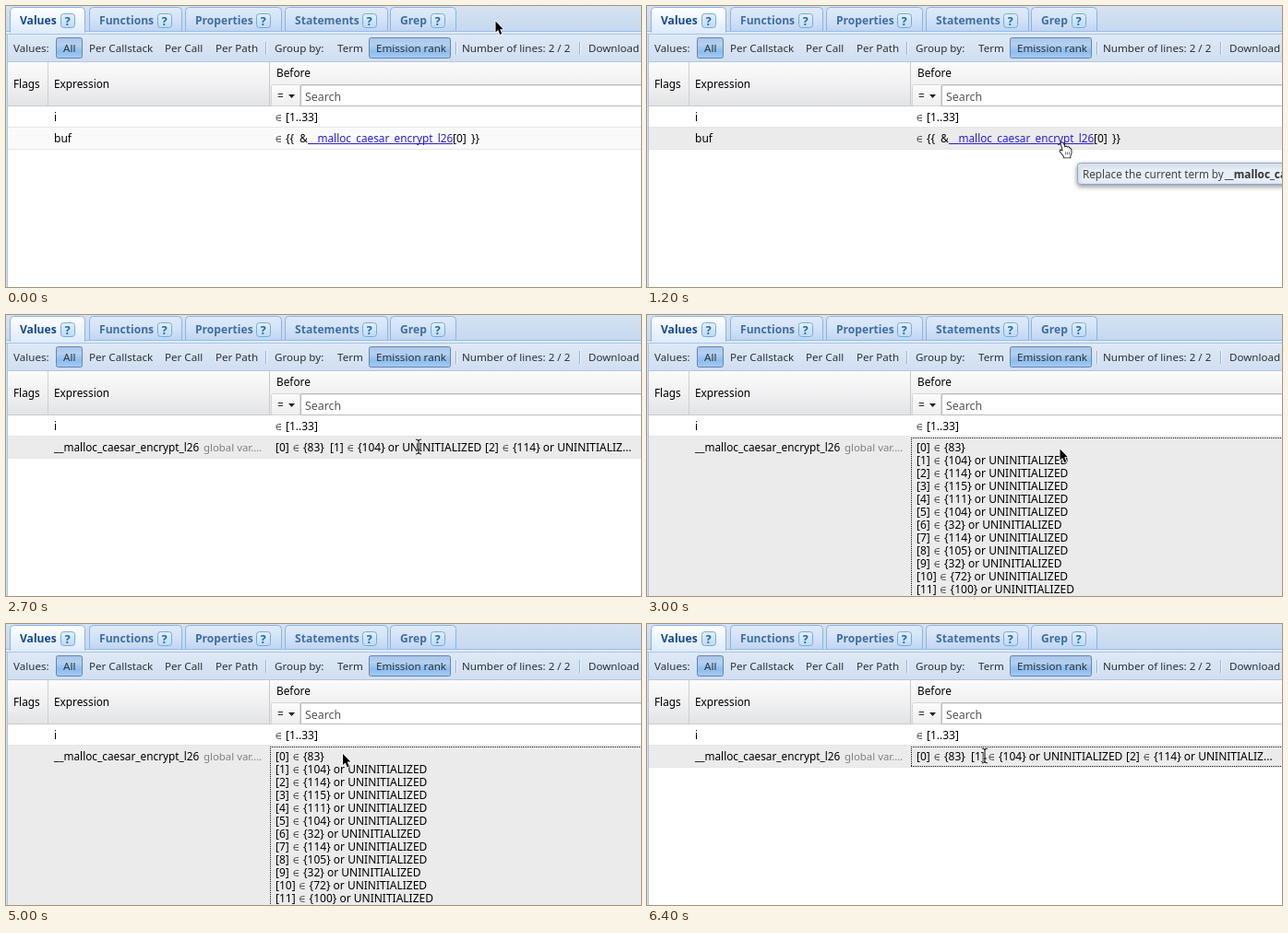
An HTML page with a canvas for the animation above (6.5 s loop, 688 px wide and 305 px high).

```html
<!DOCTYPE html>
<html lang="en">
<head>
<meta charset="utf-8">
<title>Values panel</title>
<style>
html, body { margin: 0; width: 100%; height: 100%; overflow: hidden; background: #fff; }
canvas { display: block; }
</style>
</head>
<body>
<canvas id="stage" width="688" height="305"></canvas>
<script>
const ctx = document.getElementById('stage').getContext('2d');
const W = 688, H = 305, LOOP = 6500;
const FAMILY = '"Noto Sans", "Open Sans", sans-serif';
const LOAD = 1520, READY = 2050, EXPAND = 3000, COLLAPSE = 5200;
const TIP_ON = 1050;
const NAME = '__malloc_caesar_encrypt_l26';

// time, x, y
const PATH = [
  [100, 530, 16], [850, 448, 146], [1500, 447, 145], [3150, 447, 145],
  [3900, 280, 253], [4010, 279, 270], [4150, 280, 266], [4850, 364, 139.5],
  [5300, 366, 143]
];
const VALUES = [83, 104, 114, 115, 111, 104, 32, 114, 105, 32, 72, 100];

function rect(x, y, w, h, fill) {
  ctx.fillStyle = fill;
  ctx.fillRect(x, y, w, h);
}

function shade(y0, y1, ...colors) {
  const g = ctx.createLinearGradient(0, y0, 0, y1);
  colors.forEach((c, i) => g.addColorStop(i / (colors.length - 1), c));
  return g;
}

function box(x, y, w, h, r, fill, stroke) {
  ctx.beginPath();
  ctx.roundRect(x + 0.5, y + 0.5, w - 1, h - 1, r);
  ctx.fillStyle = fill;
  ctx.fill();
  ctx.strokeStyle = stroke;
  ctx.lineWidth = 1;
  ctx.stroke();
}

function text(s, x, y, color = '#000', size = 11.8, weight = 400) {
  ctx.font = `${weight} ${size}px ${FAMILY}`;
  ctx.fillStyle = color;
  ctx.fillText(s, x, y);
}

function cell(s, x, y) {
  text(s, x, y, '#000', 12);
}

function line(points, color, width) {
  ctx.beginPath();
  points.forEach(([x, y], i) => i ? ctx.lineTo(x, y) : ctx.moveTo(x, y));
  ctx.strokeStyle = color;
  ctx.lineWidth = width;
  ctx.stroke();
}

// Small "element of" sign
function member(x, base) {
  ctx.beginPath();
  ctx.moveTo(x + 6, base - 6.5);
  ctx.lineTo(x + 3.8, base - 6.5);
  ctx.arc(x + 3.8, base - 3.5, 3, -Math.PI / 2, Math.PI / 2, true);
  ctx.lineTo(x + 6, base - 0.5);
  ctx.moveTo(x + 1, base - 3.5);
  ctx.lineTo(x + 6, base - 3.5);
  ctx.strokeStyle = '#333';
  ctx.lineWidth = 0.8;
  ctx.stroke();
}

function tab(label, x, w, textX, helpX, active) {
  const fill = active ? shade(2, 28, '#ffffff', '#eef5fe', '#deecfd')
                      : shade(2, 27, '#dfeaf8', '#d3e3f7', '#bfd6f2');
  ctx.beginPath();
  ctx.roundRect(x + 0.5, 1.5, w - 1, 27, [4, 4, 0, 0]);
  ctx.fillStyle = fill;
  ctx.fill();
  ctx.strokeStyle = '#8db2e3';
  ctx.lineWidth = 1;
  ctx.stroke();
  text(label, textX, 20, active ? '#15498b' : '#416da3', 12.1, 700);
  box(helpX, 8, 16, 16, 3, shade(8, 24, '#e6f1fc', '#bcd9f4'), '#76abdd');
  text('?', helpX + 4.7, 20.5, '#1f66b0', 12.5, 700);
}

function drawTabs() {
  rect(0, 0, W, 31, shade(0, 27, '#d5e2f2', '#c6d9ef'));
  tab('Functions', 90, 101, 101, 164);
  tab('Properties', 194, 105, 205, 271);
  tab('Statements', 302, 112, 313, 386);
  tab('Grep', 416, 72, 427, 460);
  rect(0, 27, W, 1, '#99bbe8');
  rect(0, 28, W, 3, '#deecfd');
  tab('Values', 4, 82, 15, 59, true);
  rect(5, 28, 80, 3, '#deecfd');
  rect(0, 30, W, 1, '#a9c5e8');
}

function pressed(x, w) {
  box(x, 34, w, 23, 2, shade(34, 57, '#a9c5e8', '#b4d0f0', '#8dbdec', '#a5cdf4'), '#6685b0');
}

function drawToolbar() {
  rect(0, 31, W, 30, shade(31, 61, '#dfe9f6', '#cfdef1'));
  pressed(54, 29);
  pressed(393, 89);
  [['Values:', 8], ['All', 62], ['Per Callstack', 90], ['Per Call', 172],
   ['Per Path', 227], ['Group by:', 291], ['Term', 359], ['Emission rank', 401],
   ['Number of lines: 2 / 2', 494], ['Download', 631]
  ].forEach(([s, x]) => text(s, x, 50, '#2c3138', 11.6));
  for (const x of [281, 487, 621]) {
    rect(x, 39, 1, 14, '#98b4d6');
    rect(x + 1, 39, 1, 14, '#f4f8fd');
  }
}

function drawHeader() {
  rect(0, 61, W, 48, shade(61, 109, '#fbfbfb', '#f1f1f2', '#e2e3e5'));
  rect(0, 60, W, 1, '#b4c8e0');
  rect(45, 61, 1, 47, '#cfcfcf');
  rect(285, 61, 1, 47, '#c9c9c9');
  rect(0, 108, W, 1, '#cbcbcb');
  text('Flags', 8, 89);
  text('Expression', 52, 89);
  text('Before', 293, 77);
  box(287, 85, 32, 24, 2, shade(85, 109, '#fcfcfc', '#eeeeef'), '#d6d6d6');
  text('=', 294, 102, '#222');
  ctx.beginPath();
  ctx.moveTo(306, 96);
  ctx.lineTo(313, 96);
  ctx.lineTo(309.5, 100);
  ctx.fillStyle = '#222';
  ctx.fill();
  box(319, 85, W, 24, 0, '#fff', '#b9bbbf');
  rect(320, 86, W, 1, '#e6e6e6');
  text('Search', 324, 102.5, '#555', 12.4);
}

function drawRow(y, h, fill) {
  rect(2, y, W, h, fill);
  rect(2, y + h - 1, W, 1, '#e6e6e6');
}

function drawFirstRow(hover) {
  drawRow(109, 23, hover ? '#ebebec' : '#ffffff');
  cell('i', 52, 125);
  member(292, 125);
  cell('[1..33]', 303, 125);
}

function drawLinkRow(hover) {
  drawRow(132, 24, hover ? '#ebebec' : '#fafafa');
  cell('buf', 52, 148);
  member(292, 148);
  cell('{{', 303, 148);
  cell('&', 318, 148);
  text(NAME, 327, 148, '#2a1fd6');
  rect(327, 149, 157, 1, '#2a1fd6');
  cell('[0]', 484, 148);
  cell('}}', 504, 148);
}

// One array entry, e.g. "[3] in {115} or UNINITIALIZED"
function entry(i, x, y, tail) {
  const shift = (String(i).length - 1) * 6.6;
  cell(`[${i}]`, x, y);
  member(x + shift + 19, y);
  cell(`{${VALUES[i]}}${tail}`, x + shift + 30, y);
}

function dotted(x, y, w, h) {
  ctx.setLineDash([1, 1]);
  line([[x, y + 0.5], [x + w, y + 0.5]], '#111', 1);
  line([[x, y + h + 0.5], [x + w, y + h + 0.5]], '#111', 1);
  line([[x + 0.5, y], [x + 0.5, y + h]], '#111', 1);
  ctx.setLineDash([]);
}

function drawArrayRow(expanded, focus) {
  drawRow(132, expanded ? 190 : 24, '#ebebec');
  text(NAME, 52, 148);
  text('global var....', 214, 148, '#808080', 11.4);
  if (expanded) {
    VALUES.forEach((v, i) => entry(i, 292, 148 + i * 14, i ? ' or UNINITIALIZED' : ''));
  } else {
    entry(0, 292, 148, '');
    entry(1, 351, 148, ' or UNINITIALIZED');
    entry(2, 519, 148, ' or UNINITIALIZ...');
  }
  if (focus) dotted(286, 133, W, expanded ? 190 : 21);
}

function drawMask(t) {
  rect(2, 109, W, H, '#e0e0e1');
  box(521, 252, 100, 34, 0, '#d7e5f7', '#8fb4e2');
  box(524, 255, 94, 28, 0, '#efefef', '#a4bfe0');
  const step = Math.floor(t / 100);
  for (let i = 0; i < 8; i++) {
    const a = i * Math.PI / 4;
    const g = 75 + ((step - i) % 8 + 8) % 8 * 19;
    ctx.beginPath();
    ctx.arc(540 + 6.3 * Math.cos(a), 270 + 6.3 * Math.sin(a), 2.2, 0, 7);
    ctx.fillStyle = `rgb(${g},${g},${g})`;
    ctx.fill();
  }
  text('Loading...', 552, 274, '#222');
}

function drawTooltip() {
  ctx.save();
  ctx.shadowColor = 'rgba(0,0,0,0.4)';
  ctx.shadowBlur = 5;
  ctx.shadowOffsetY = 2;
  box(466, 170, 260, 24, 3, '#e6eef8', '#8eaace');
  ctx.restore();
  text('Replace the current term by', 472, 187, '#444', 11.7);
  text(NAME, 626, 187, '#333', 11.8, 700);
}

function polygon(points, fill, stroke, width) {
  ctx.beginPath();
  points.forEach(([x, y], i) => i ? ctx.lineTo(x, y) : ctx.moveTo(x, y));
  ctx.closePath();
  ctx.lineJoin = 'round';
  ctx.strokeStyle = stroke;
  ctx.lineWidth = width;
  ctx.stroke();
  ctx.fillStyle = fill;
  ctx.fill();
}

function arrow() {
  polygon([[0.5, 0.5], [0.5, 12.6], [3.2, 10], [5.2, 15], [7.2, 14.1], [5.2, 9.2], [8.8, 9.2]],
    '#000', '#fff', 1.6);
}

function hand() {
  polygon([[1, 4], [2, 2.8], [3.5, 3.5], [5.2, 8], [6.5, 7], [8, 8], [9.5, 7.8],
    [10.5, 9.2], [12, 10], [12.2, 14], [11, 17], [11, 19], [4.5, 19], [4, 17],
    [0.2, 12.5], [0.5, 11], [3, 12], [2.8, 9]], '#fff', '#111', 1.8);
  for (const x of [6, 8, 10]) line([[x, 13], [x, 16]], '#333', 0.7);
}

function beam() {
  for (const [color, width] of [['#fff', 2.6], ['#111', 1.1]]) {
    line([[-3, -8], [-1, -7.5], [0, -6.5], [1, -7.5], [3, -8]], color, width);
    line([[0, -6.5], [0, 6.5]], color, width);
    line([[-3, 8], [-1, 7.5], [0, 6.5], [1, 7.5], [3, 8]], color, width);
    line([[-2, 3], [2, 3]], color, width);
  }
}

function cursorAt(t) {
  if (t <= PATH[0][0]) return PATH[0].slice(1);
  for (let i = 1; i < PATH.length; i++) {
    const [t0, x0, y0] = PATH[i - 1], [t1, x1, y1] = PATH[i];
    if (t < t1) {
      const p = (t - t0) / (t1 - t0), e = p * p * (3 - 2 * p);
      return [x0 + (x1 - x0) * e, y0 + (y1 - y0) * e];
    }
  }
  return PATH[PATH.length - 1].slice(1);
}

function cursorShape(t, x, y) {
  if (t < LOAD) return y > 137 ? hand : arrow;
  if (t < READY) return arrow;
  if (t < EXPAND || t >= COLLAPSE) return beam;
  return x > 291 && x < 458 && y > 151 ? beam : arrow;
}

function draw(t) {
  const [x, y] = cursorAt(t);
  rect(0, 0, W, H, '#fff');
  drawTabs();
  drawToolbar();
  drawHeader();
  if (t >= LOAD && t < READY) {
    drawMask(t);
  } else {
    drawFirstRow(y >= 109 && y < 132);
    if (t < LOAD) drawLinkRow(y >= 132);
    else drawArrayRow(t >= EXPAND && t < COLLAPSE, t >= EXPAND);
  }
  rect(0, 31, 1, H, '#d3e1f2');
  rect(1, 31, 1, H, '#a9c5e6');
  if (t >= TIP_ON && t < LOAD - 30) drawTooltip();

  const shape = cursorShape(t, x, y);
  ctx.save();
  ctx.translate(x, shape === beam && y < 150 ? 143 : y);
  shape();
  ctx.restore();
}

function tick(now) {
  draw(now % LOOP);
  requestAnimationFrame(tick);
}
requestAnimationFrame(tick);
</script>
</body>
</html>
```
